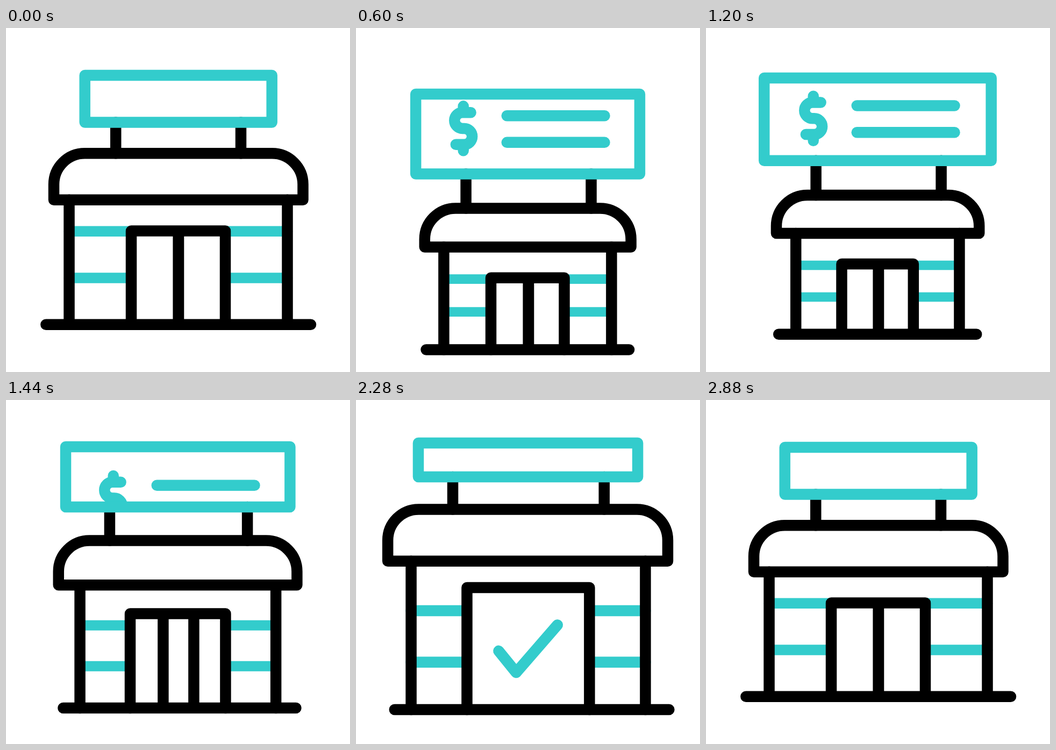
An HTML page with a canvas that plays this animation: 640 by 640 pixels, repeating every 3000 ms.

```html
<!DOCTYPE html>
<html lang="en">
<head>
<meta charset="utf-8">
<title>Shop</title>
<style>
  html, body { margin: 0; width: 100%; height: 100%; overflow: hidden; background: #fff; }
  canvas { display: block; }
</style>
</head>
<body>
<canvas id="stage" width="640" height="640"></canvas>
<script>
const ctx = document.getElementById('stage').getContext('2d');
const TEAL = '#33cccc', BLACK = '#000', LINE = 20.5;
const LOOP = 3000, STEP = 40, MID = 320.9;

// Each part lists its coordinates in the three poses: plain, billboard, open.
const poses = {
  plain: {
    sign: [146.7, 494.7, 88, 175.5], posts: [204.2, 437], roof: [89, 552.5, 233.3, 319.7],
    walls: [117.5, 523.5], ground: [74.3, 567, 551.7], door: [233, 408, 377.5], stripes: [378.3, 465, 19.6]
  },
  billboard: {
    sign: [108.2, 530.7, 93, 246.7], posts: [204.6, 437.6], roof: [131, 508.2, 311, 382],
    walls: [167.2, 471.4], ground: [135.2, 503.2, 569.6], door: [252.5, 385.8, 439], stripes: [441.5, 500.5, 17.6]
  },
  open: {
    sign: [114.4, 525.6, 79.6, 141.3], posts: [178.8, 463], roof: [57.6, 581.4, 202, 298.7],
    walls: [101.8, 539.2], ground: [71.6, 583.2, 577.2], door: [205.1, 435.7, 347.6], stripes: [392.6, 488.9, 20.5]
  }
};

// Cubic bezier easing (1/3, 0, 1/3, 1)
function ease(x) {
  let s = x;
  for (let i = 0; i < 8; i++) s -= (s - s * s + s ** 3 - x) / (1 - 2 * s + 3 * s * s);
  return s * s * (3 - 2 * s);
}
const span = (t, from, to) => ease(Math.min(1, Math.max(0, (t - from) / (to - from))));

function mix(a, b, k) {
  const out = {};
  for (const part in a) out[part] = a[part].map((v, i) => v + (b[part][i] - v) * k);
  return out;
}

function poseAt(t) {
  if (t < 1190) return mix(poses.plain, poses.billboard, span(t, 100, 801));
  if (t < 2200) return mix(poses.billboard, poses.open, span(t, 1190, 1900));
  return mix(poses.open, poses.plain, span(t, 2200, 2880));
}

function stroke(path, color, width = LINE) {
  ctx.strokeStyle = color;
  ctx.lineWidth = width;
  ctx.stroke(new Path2D(path));
}
const line = (x1, y1, x2, y2, color, width) => stroke(`M${x1} ${y1}L${x2} ${y2}`, color, width);

function clipped(x, y, right, bottom, paint) {
  ctx.save();
  ctx.beginPath();
  ctx.rect(x, y, right - x, bottom - y);
  ctx.clip();
  paint();
  ctx.restore();
}

function drawOffer(y) {
  ctx.translate(0, y);
  stroke('M199.7 126.7V138.5M213.6 138.5H198.2a14.9 14.9 0 0 0 0 29.8H201.2a14.9 14.9 0 0 1 0 29.8H185.8M199.7 198V209.7', TEAL);
  line(280.7, 144.6, 462.5, 144.6, TEAL);
  line(280.7, 194.2, 462.5, 194.2, TEAL);
}

function draw(t) {
  const p = poseAt(t);
  const drop = 30.5 * (span(t, 100, 640) - span(t, 640, 1220));
  const closing = span(t, 2200, 2880);
  const gap = 134 * (span(t, 1280, 1960) - closing);
  const offerY = 67 * (1 - span(t, 247, 947) + span(t, 1280, 1960));
  const tickY = 170 * (1 - span(t, 1360, 1800)) + 12 * closing;

  for (const [part, ids] of [['sign', [2, 3]], ['roof', [2, 3]], ['ground', [2]], ['door', [2]], ['stripes', [0, 1]]])
    for (const i of ids) p[part][i] += drop;

  const [signL, signR, signT, signB] = p.sign;
  const [roofL, roofR, roofT, roofB] = p.roof;
  const [groundL, groundR, groundY] = p.ground;
  const [doorL, doorR, doorT] = p.door;
  const [stripe1, stripe2, stripeW] = p.stripes;
  const r = 57.5;

  ctx.fillStyle = '#fff';
  ctx.fillRect(0, 0, 640, 640);
  ctx.lineCap = ctx.lineJoin = 'round';

  for (const y of [stripe1, stripe2]) line(p.walls[0], y, p.walls[1], y, TEAL, stripeW);
  ctx.fillRect(doorL, doorT, doorR - doorL, groundY - doorT);

  clipped(Math.max(doorL, MID - gap), doorT, Math.min(doorR, MID + gap), groundY, () => {
    ctx.translate(0, tickY);
    stroke('M265.4 466.3L298 506.5L374.8 418', TEAL);
  });
  clipped(doorL, doorT, doorR, groundY, () => {
    for (const x of [MID - gap, MID + gap]) line(x, doorT, x, groundY, BLACK);
  });
  stroke(`M${doorL} ${groundY}V${doorT}H${doorR}V${groundY}`, BLACK);

  for (const x of p.walls) line(x, roofB, x, groundY, BLACK);
  line(groundL, groundY, groundR, groundY, BLACK);
  for (const x of p.posts) line(x, signB, x, roofT, BLACK);
  stroke(`M${roofL} ${roofB}V${roofT + r}a${r} ${r} 0 0 1 ${r} ${-r}H${roofR - r}a${r} ${r} 0 0 1 ${r} ${r}V${roofB}Z`, BLACK);

  clipped(signL, signT, signR, signB, () => drawOffer(offerY));
  stroke(`M${signL} ${signT}H${signR}V${signB}H${signL}Z`, TEAL);
}

const start = performance.now();
function tick() {
  const t = (performance.now() - start) % LOOP;
  draw(Math.floor(t / STEP) * STEP);
  requestAnimationFrame(tick);
}
tick();
</script>
</body>
</html>
```
